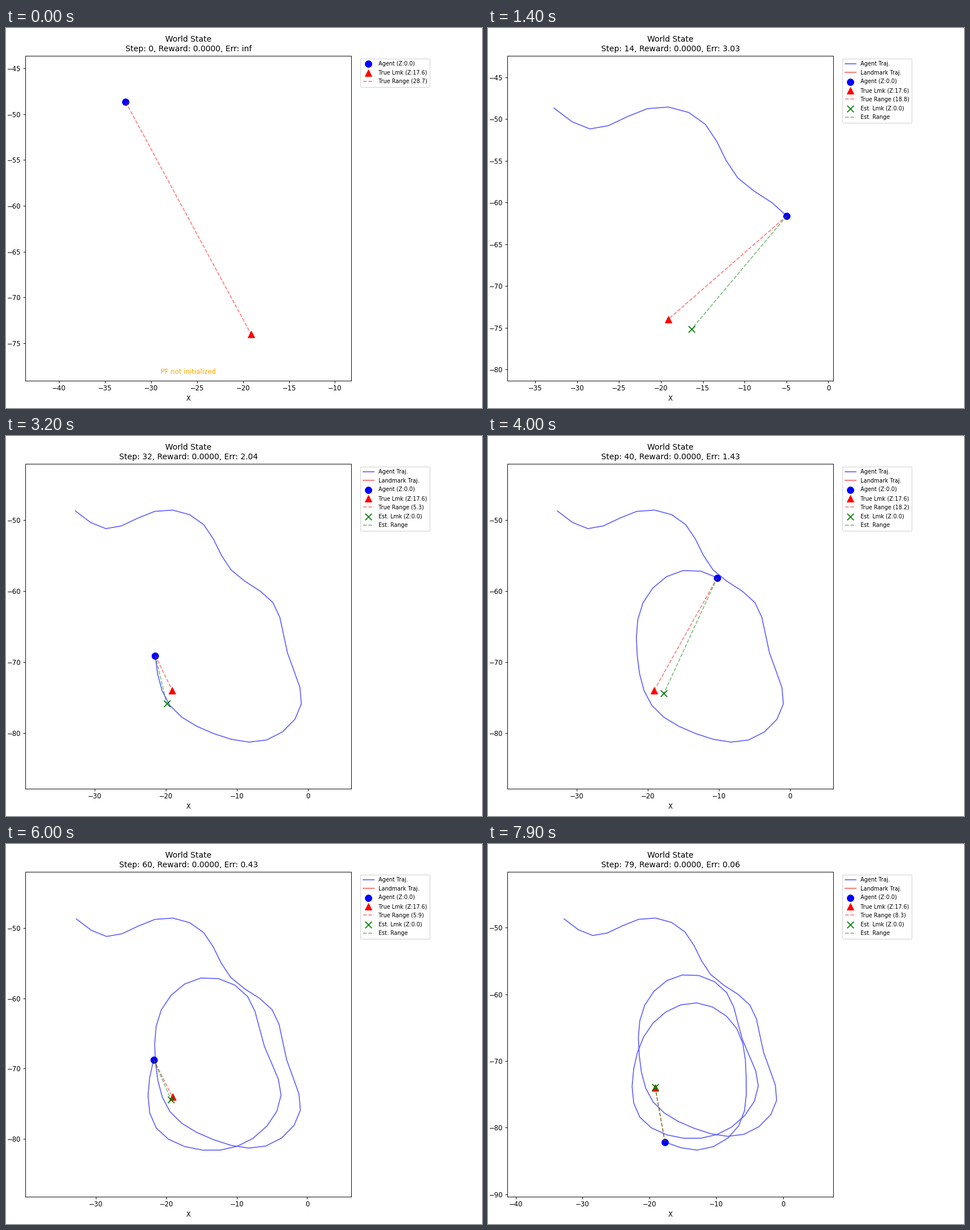
A matplotlib script that plays this animation: 837 by 669 pixels, repeating every 8 s.

```python
import numpy as np
import matplotlib.pyplot as plt
from matplotlib.animation import FuncAnimation

W, H = 837, 669
DPI = 1000 / 12
STEPS = 80
BOX = [34.2 / W, 48.4 / H, 572.9 / W, 571.9 / H]

LMK = np.array([-19.13, -74.0])

# Waypoints the agent passes, one every third step
WAYPOINTS = np.array([
    (-32.76, -48.69), (-28.47, -51.18), (-21.61, -48.75), (-14.69, -50.63),
    (-10.84, -57.02), (-4.97, -61.60), (-2.90, -68.75), (-0.96, -75.92),
    (-5.87, -81.02), (-13.27, -80.12), (-19.46, -76.14), (-21.52, -69.10),
    (-20.71, -61.65), (-15.08, -57.10), (-8.45, -59.73), (-6.07, -66.81),
    (-3.70, -73.77), (-7.68, -79.92), (-14.85, -81.60), (-21.41, -78.46),
    (-22.35, -71.24), (-19.46, -64.33), (-12.92, -61.29), (-6.89, -65.19),
    (-5.52, -72.45), (-6.63, -79.73), (-12.88, -83.38), (-17.67, -82.17)])
WAY_STEPS = np.r_[0, 2:78:3, STEPS - 1]

# Estimate error around the landmark: step, distance, bearing in degrees
EST_KEYS = np.array([
    (1, 3.2, -100), (8, 2.49, -108), (20, 3.57, 63), (32, 2.04, 248),
    (47, 0.89, 425), (60, 0.43, 602), (79, 0.06, 810)])


def spline(t, p, at):
    """Natural cubic spline through points p at times t."""
    h = np.diff(t)[:, None]
    slope = np.diff(p, axis=0) / h
    m = np.eye(len(t))
    rhs = np.zeros_like(p)
    for i in range(1, len(t) - 1):
        a, b = h[i - 1, 0], h[i, 0]
        m[i, i - 1:i + 2] = a, 2 * (a + b), b
        rhs[i] = 6 * (slope[i] - slope[i - 1])
    bend = np.linalg.solve(m, rhs)
    i = np.clip(np.searchsorted(t, at, side="right") - 1, 0, len(t) - 2)
    u = (at - t[i])[:, None]
    return (p[i] + u * (slope[i] - h[i] * (2 * bend[i] + bend[i + 1]) / 6)
            + u**2 * bend[i] / 2 + u**3 * (bend[i + 1] - bend[i]) / (6 * h[i]))


PATH = spline(WAY_STEPS, WAYPOINTS, np.arange(STEPS))


def estimate(k):
    steps, dist, bearing = EST_KEYS.T
    err = np.interp(k, steps, dist)
    angle = np.radians(np.interp(k, steps, bearing))
    return err, LMK + err * np.array([np.cos(angle), np.sin(angle)])


def measured_range(k):
    ripple = np.exp(-((k - 24) / 8)**2) * np.cos(np.pi * (k - 20) / 12)
    return np.hypot(*(PATH[k] - LMK)) + 0.32 * ripple


fig = plt.figure(figsize=((W + 1e-6) / DPI, (H + 1e-6) / DPI), dpi=DPI, facecolor="white")
ax = fig.add_axes(BOX)


def link(a, b, style, label):
    ax.plot([a[0], b[0]], [a[1], b[1]], style, alpha=0.5, label=label)


def fit_view(points):
    low, high = points.min(axis=0), points.max(axis=0)
    mid, half = (low + high) / 2, 0.7 * (high - low).max()
    ax.set_xlim(mid[0] - half, mid[0] + half)
    ax.set_ylim(mid[1] - half, mid[1] + half)


def draw(k):
    ax.clear()
    agent = PATH[k]
    seen = [*PATH[:k + 1], LMK]
    if k:
        ax.plot(*PATH[:k + 1].T, "b-", alpha=0.6, label="Agent Traj.")
        ax.plot(*LMK, "r-", alpha=0.6, label="Landmark Traj.")
    ax.scatter(*agent, c="blue", marker="o", s=100, label="Agent (Z:0.0)")
    ax.scatter(*LMK, c="red", marker="^", s=100, label="True Lmk (Z:17.6)")
    link(agent, LMK, "r--", f"True Range ({measured_range(k):.1f})")

    if k:
        err, est = estimate(k)
        ax.scatter(*est, c="green", marker="x", s=100, label="Est. Lmk (Z:0.0)")
        link(agent, est, "g--", "Est. Range")
        seen.append(est)
        err_text = f"{err:.2f}"
    else:
        ax.text(0.5, 0.02, "PF not initialized", color="orange",
                ha="center", transform=ax.transAxes)
        err_text = "inf"

    fit_view(np.array(seen))
    ax.tick_params(axis="x", pad=3)
    ax.set_xlabel("X")
    ax.set_title(f"World State\nStep: {k}, Reward: 0.0000, Err: {err_text}",
                 pad=6.6, linespacing=1.25)
    ax.legend(loc="upper left", bbox_to_anchor=(1.02, 1), fontsize="small",
              labelspacing=0.59, borderpad=0.46)
    return []


anim = FuncAnimation(fig, draw, frames=STEPS, interval=100, repeat=True, repeat_delay=0)
plt.show()
```
